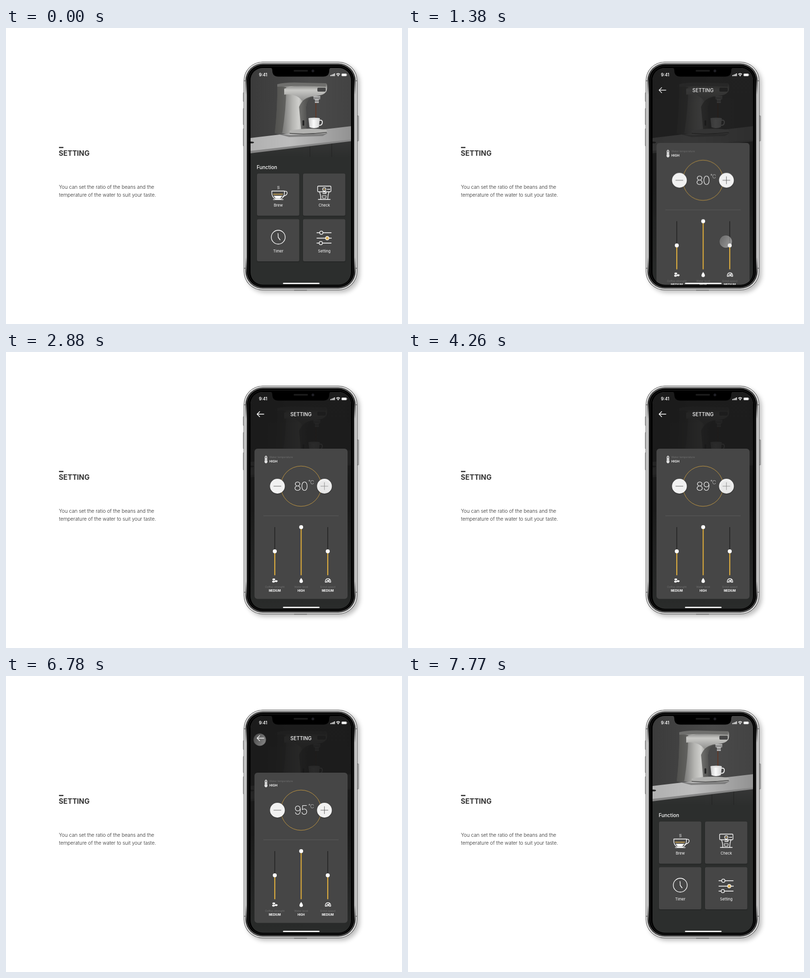
Recreate the animation shown at these times as an HTML page. Size 800 by 600 pixels, loop 8.22 s.

```html
<!DOCTYPE html>
<html lang="en">
<head>
<meta charset="utf-8">
<title>Setting</title>
<style>
html, body { margin: 0; width: 100%; height: 100%; overflow: hidden; background: #fff; }
svg { display: block; width: 800px; height: 600px; font-family: Inter, sans-serif; }
.mid { text-anchor: middle; }
.line { fill: none; stroke: #fff; stroke-width: 1.3; stroke-linecap: round; stroke-linejoin: round; }
.tile { fill: #464646; filter: drop-shadow(0 1px 1px rgba(0,0,0,.25)); }
.label { font-size: 7.6px; fill: #fff; text-anchor: middle; }
.dim { font-size: 5.4px; fill: #707070; }
.value { font-size: 5.7px; font-weight: 700; fill: #fff; text-anchor: middle; }

#panel, .shade, #pointer { animation: 8220ms linear infinite both; }
#panel { animation-name: slide; }
.shade { animation-name: shade; }
#pointer { animation-name: move; }

@keyframes slide {
  0%, 14.6% { transform: translateY(325px); animation-timing-function: ease; }
  18.25%, 84.67% { transform: none; animation-timing-function: ease; }
  88.32%, 100% { transform: translateY(325px); }
}
@keyframes shade {
  0%, 14.6% { opacity: 0; animation-timing-function: ease; }
  18.25%, 84.67% { opacity: 1; animation-timing-function: ease; }
  88.32%, 100% { opacity: 0; }
}
@keyframes move {
  0% { transform: translate(642px, 536px); animation-timing-function: cubic-bezier(.33,0,.67,1); }
  9.85%, 20.44% { transform: translate(642px, 433px); animation-timing-function: cubic-bezier(.33,0,.67,1); }
  32.85%, 73.48% { transform: translate(643px, 272px); animation-timing-function: cubic-bezier(.33,0,.67,1); }
  82.85%, 87.59% { transform: translate(512px, 128.5px); opacity: 1; }
  93.67%, 100% { transform: translate(512px, 128.5px); opacity: 0; }
}
</style>
</head>
<body>
<svg viewBox="0 0 800 600">
  <defs>
    <clipPath id="screen"><rect x="494" y="81" width="203" height="439.5" rx="25"/></clipPath>
    <linearGradient id="rim" x2="0" y2="1">
      <stop stop-color="#555"/><stop offset=".07" stop-color="#333"/><stop offset=".14" stop-color="#a8a8a8"/>
      <stop offset=".86" stop-color="#a8a8a8"/><stop offset=".93" stop-color="#333"/><stop offset="1" stop-color="#555"/>
    </linearGradient>
    <linearGradient id="wall">
      <stop stop-color="#3b3b3b"/><stop offset=".6" stop-color="#4a4a4a"/><stop offset="1" stop-color="#434343"/>
    </linearGradient>
    <linearGradient id="counter">
      <stop stop-color="#b0b0b0"/><stop offset=".4" stop-color="#bdbdbd"/><stop offset="1" stop-color="#929292"/>
    </linearGradient>
    <linearGradient id="cabinet" x2="0" y2="1">
      <stop stop-color="#383838"/><stop offset="1" stop-color="#2c2e2d"/>
    </linearGradient>
    <linearGradient id="column">
      <stop stop-color="#565654"/><stop offset=".2" stop-color="#7b7b79"/><stop offset=".45" stop-color="#b4b4b1"/>
      <stop offset=".62" stop-color="#d0d0cd"/><stop offset=".82" stop-color="#777775"/><stop offset="1" stop-color="#4b4b4a"/>
    </linearGradient>
    <linearGradient id="head" x2="0" y2="1">
      <stop stop-color="#70706e"/><stop offset=".35" stop-color="#c9c9c6"/><stop offset="1" stop-color="#8b8b89"/>
    </linearGradient>
    <linearGradient id="cup">
      <stop stop-color="#c9c9c9"/><stop offset=".45" stop-color="#fafafa"/><stop offset="1" stop-color="#d4d4d4"/>
    </linearGradient>
    <linearGradient id="veil" x2="0" y2="1">
      <stop stop-color="#191919" stop-opacity=".93"/><stop offset=".55" stop-color="#191919" stop-opacity=".92"/>
      <stop offset="1" stop-color="#1c1c1c" stop-opacity=".1"/>
    </linearGradient>
    <linearGradient id="touch" x2="1" y2=".5">
      <stop stop-color="#fff" stop-opacity=".2"/><stop offset="1" stop-color="#fff" stop-opacity=".45"/>
    </linearGradient>
  </defs>

  <rect x="107" y="241" width="9" height="2.4" fill="#333"/>
  <text x="106.5" y="259" font-size="14.2" font-weight="700" fill="#333">SETTING</text>
  <g font-size="9.95" font-weight="300" fill="#2c2c2c">
    <text x="107" y="326">You can set the ratio of the beans and the</text>
    <text x="107" y="342">temperature of the water to suit your taste.</text>
  </g>

  <!-- phone -->
  <g fill="#d0d0d0" stroke="#777" stroke-width=".6">
    <rect x="479" y="131" width="3" height="18" rx="1"/>
    <rect x="479" y="163" width="3" height="33" rx="1"/>
    <rect x="479" y="204" width="3" height="35" rx="1"/>
    <rect x="708" y="178" width="4.5" height="51" rx="1"/>
  </g>
  <rect x="480.3" y="68.500" width="229.400" height="463" rx="38" fill="#4a4a4a" style="filter:drop-shadow(5px 5px 4px rgba(0,0,0,.25))"/>
  <rect x="481.300" y="69.500" width="227.400" height="461" rx="37" fill="#e6e6e6"/>
  <rect x="483.600" y="71.600" width="222.800" height="456.800" rx="35" fill="url(#rim)"/>
  <rect x="487" y="74.500" width="216" height="451" rx="32"/>
  <rect x="490" y="77.500" width="210" height="445.500" rx="29" fill="none" stroke="#2b2b2b" stroke-width=".8"/>
  <path d="M480.500 107h3m223 0h3M480.500 487h3m223 0h3M582 531.500h26" stroke="#666" stroke-width="1.600"/>

  <g clip-path="url(#screen)">
    <rect x="494" y="81" width="203" height="440" fill="#2c2e2d"/>

    <!-- hero picture -->
    <rect x="494" y="81" width="203" height="150" fill="url(#wall)"/>
    <path d="M494 235L697 220V262H494z" fill="url(#cabinet)"/>
    <path d="M614 239v22M658 233v28" stroke="#232323"/>
    <path d="M494 223L697 199V227L494 251z" fill="url(#counter)"/>
    <path d="M494 249L697 226V229.500L494 254z" fill="#858585"/>
    <ellipse cx="496" cy="232" rx="5" ry="1.800" fill="#222"/>
    <path d="M541 213L575 217L650 213L640 219L572 221z" fill="#6c6c6c" opacity=".7"/>
    <path d="M548 114L606 112L622 138Q608 142 606 160L607 212L573 215L543 213Q549 160 548 114z" fill="url(#column)"/>
    <path d="M548 116L566 120Q566 165 558 213L543 213Q549 160 548 116z" fill="#50504e" opacity=".7"/>
    <path d="M562 123Q590 113 648 113Q650 121 647 129Q641 137 626 138Q609 140 600 150Q588 132 562 135z" fill="url(#head)"/>
    <path d="M548 114Q565 109 602 111L647 112L646 119Q600 116 548 119z" fill="#6f6f6d"/>
    <path d="M592 160Q600 140 622 138Q608 142 606 160L607 210L597 212z" fill="#3f3f3e" opacity=".65"/>
    <rect x="629" y="121" width="17" height="8" rx="2" fill="#484848"/>
    <rect x="599" y="187" width="3.500" height="11" rx="1.500" fill="#222"/>
    <path d="M621 138h14v6l-3 1v7h-8v-7l-3-1z" fill="#b0b0b0"/>
    <path d="M621 142h14M624 148h8" stroke="#444"/>
    <path d="M573 208Q610 201 646 206Q652 210 645 214Q610 217 573 215z" fill="#b2b2b0"/>
    <path d="M573 213.500Q610 216.500 648 211.500" fill="none" stroke="#484848" stroke-width="1.500"/>
    <path d="M626 152v32" stroke="#6a341c" stroke-width="1.300"/>
    <path d="M611 183h23l-2 18q-10 4-19 0z" fill="url(#cup)"/>
    <ellipse cx="622.500" cy="183.500" rx="11.500" ry="1.800" fill="#e0e0e0"/>
    <path d="M633 187q7-1 6 5t-7 5" fill="none" stroke="#e4e4e4" stroke-width="2"/>

    <!-- menu -->
    <text x="506.500" y="286" font-size="10" font-weight="500" fill="#fff">Function</text>
    <g class="tile">
      <rect x="507" y="295" width="85.500" height="85.500" rx="3"/><rect x="600" y="295" width="85.500" height="85.500" rx="3"/>
      <rect x="507" y="387.500" width="85.500" height="85.500" rx="3"/><rect x="600" y="387.500" width="85.500" height="85.500" rx="3"/>
    </g>
    <g class="label">
      <text x="550" y="362">Brew</text><text x="643" y="362">Check</text>
      <text x="550" y="454.500">Timer</text><text x="643" y="454.500">Setting</text>
    </g>
    <g class="line">
      <path d="M537 330.500h25.500v4q0 8-7 12h-11.500q-7-4-7-12zM562.500 331q5.500-1 5.500 3.500t-9 7M540 347.800h20"/>
      <path d="M549.300 320.500q-1.500 2 0 3t-.5 3M551.600 320.500q-1.500 2 0 3t-.5 3" stroke-width=".8"/>
      <path d="M540 337h19.500" stroke="#d9ae55" stroke-width="2.500" stroke-dasharray="1.500 .7" stroke-linecap="butt"/>
      <path d="M541.500 340.500h16l-3.500 4.500h-9z" fill="#fff" stroke-width=".8"/>
      <rect x="629.500" y="320.500" width="27" height="11.500" rx="1.500"/>
      <circle cx="643" cy="327" r="3.300"/><circle cx="643" cy="327" r=".7" stroke="#d9ae55"/>
      <path d="M650 327h.5M653 327h.5" stroke-width="2"/>
      <path d="M633.500 332q2.500 7 2.500 14.500M652.500 332q-2.500 7-2.500 14.500M640 332.500h6.500v3h-6.500M631 347.500h24"/>
      <path d="M639 340h8l-1 5h-6z" stroke-width="1"/>
      <circle cx="550" cy="424" r="14"/><path d="M549.500 416.500l.5 8l3.800 5"/>
      <path d="M628 415h5.500m7 0H657M628 426h17m7.500 0h5M628 436h4.500m7 0H657"/>
      <circle cx="637" cy="415" r="3.300"/><circle cx="636" cy="436" r="3.300"/>
      <circle cx="649" cy="426" r="3.500" fill="#d9ae55"/>
    </g>

    <rect class="shade" x="494" y="81" width="203" height="440" fill="url(#veil)"/>
    <g class="shade">
      <path class="line" d="M521 126H507.500m5-5.300l-5.300 5.300l5.300 5.300"/>
      <text class="mid" x="596" y="130" font-size="9.900" font-weight="500" fill="#fff">SETTING</text>
    </g>

    <g id="panel">
      <rect x="502" y="196" width="188" height="304.500" rx="6" fill="#464646"/>
      <path class="line" d="M523.500 220v-7.500q1.700-3 3.400 0V220q2 3-1.700 5q-3.700-2-1.700-5zM525.200 215v6.500" stroke-width="1"/>
      <circle cx="525.200" cy="222.200" r="1.500" fill="#fff"/>
      <text class="dim" x="532" y="215">Water temperature</text>
      <text x="532" y="224" font-size="6.500" font-weight="600" fill="#fff">HIGH</text>
      <circle cx="596" cy="272" r="40.800" fill="none" stroke="#bd9441"/>
      <g fill="#f1f1f1" style="filter:drop-shadow(0 1px 1px rgba(0,0,0,.3))">
        <circle cx="548.300" cy="272" r="15"/><circle cx="643.300" cy="272" r="15"/>
      </g>
      <path d="M540.500 272h15.500M635.500 272h15.500M643.300 264.200v15.500" stroke="#555" stroke-width=".9"/>
      <g fill="#fff" font-weight="200">
        <text id="degrees" class="mid" x="595.500" y="281" font-size="25" letter-spacing="-1">80</text>
        <circle cx="613" cy="260.800" r="1.100" fill="none" stroke="#fff" stroke-width=".6"/>
        <text x="614.800" y="267.500" font-size="10.500">C</text>
      </g>
      <path d="M520 332h152" stroke="#5b5b5b"/>
      <g id="sliders"></g>
      <g fill="#fff">
        <ellipse cx="541" cy="461" rx="2.800" ry="1.900"/><ellipse cx="540.500" cy="465.500" rx="2.800" ry="1.900"/><ellipse cx="545.800" cy="464.500" rx="2.800" ry="1.900"/>
        <path d="M596.300 458q7 9 0 10.300q-7-1.300 0-10.300z"/>
      </g>
      <path class="line" d="M645 466.500q0-7 5.500-7t5.500 7h-3q0-3.500-2.500-3.500t-2.500 3.500zM650 466.500l3.500-4.500" stroke-width=".9"/>
    </g>

    <rect x="559.500" y="516.500" width="74" height="2.600" rx="1.300" fill="#fff"/>
    <circle id="pointer" r="12.500" fill="url(#touch)" style="filter:drop-shadow(0 1px 1px rgba(0,0,0,.25))"/>
  </g>

  <!-- notch and status bar -->
  <path d="M532 80q6 0 6 6q0 12.500 12.500 12.500h90q12.500 0 12.500-12.500q0-6 6-6z"/>
  <rect x="581" y="85" width="29" height="3.500" rx="1.700" fill="#1b1b1b"/>
  <circle cx="620" cy="87" r="2.700" fill="#202026"/>
  <text x="511" y="98" font-size="8.400" font-weight="600" fill="#fff">9:41</text>
  <path d="M656 97.500v-2m2.500 2v-3m2.500 3v-4m2.500 4v-5.500" stroke="#fff" stroke-width="1.700"/>
  <path d="M667.200 94q3.800-3.500 7.600 0M668.800 95.800q2.200-2 4.400 0" fill="none" stroke="#fff" stroke-width="1.200"/>
  <circle cx="671" cy="97" r=".9" fill="#fff"/>
  <rect x="678" y="92.500" width="10" height="5" rx="1.300" fill="#fff"/><rect x="688.800" y="94" width=".9" height="2" fill="#aaa"/>
</svg>
<script>
const LOOP = 8220;
const sliders = [
  [543, 404, 'Coffee strenght', 'MEDIUM'],
  [596.3, 355, 'Water level', 'HIGH'],
  [650, 404, 'Grind speed', 'MEDIUM']
];
document.getElementById('sliders').innerHTML = sliders.map(([x, y, name, value]) => `
  <path d="M${x} 355V452" stroke="#2b2b2b" stroke-width="2"/>
  <path d="M${x} ${y}V452.500" stroke="#d8a93f" stroke-width="2.200"/>
  <circle cx="${x}" cy="${y}" r="4" fill="#fff"/>
  <text class="dim mid" x="${x}" y="478">${name}</text>
  <text class="value" x="${x}" y="486">${value}</text>`).join('');

// Moments at which the temperature gains one degree.
const ticks = [2940, 3090, 3240, 3390, 3540, 3690, 3840, 4020, 4200, 4440, 4740, 4950, 5160, 5400, 5700];
const degrees = document.getElementById('degrees');
const clock = document.getElementById('panel').getAnimations()[0];

function draw() {
  const time = (clock.currentTime || 0) % LOOP;
  degrees.textContent = 80 + ticks.filter(tick => tick <= time).length;
  requestAnimationFrame(draw);
}
draw();
</script>
</body>
</html>
```
